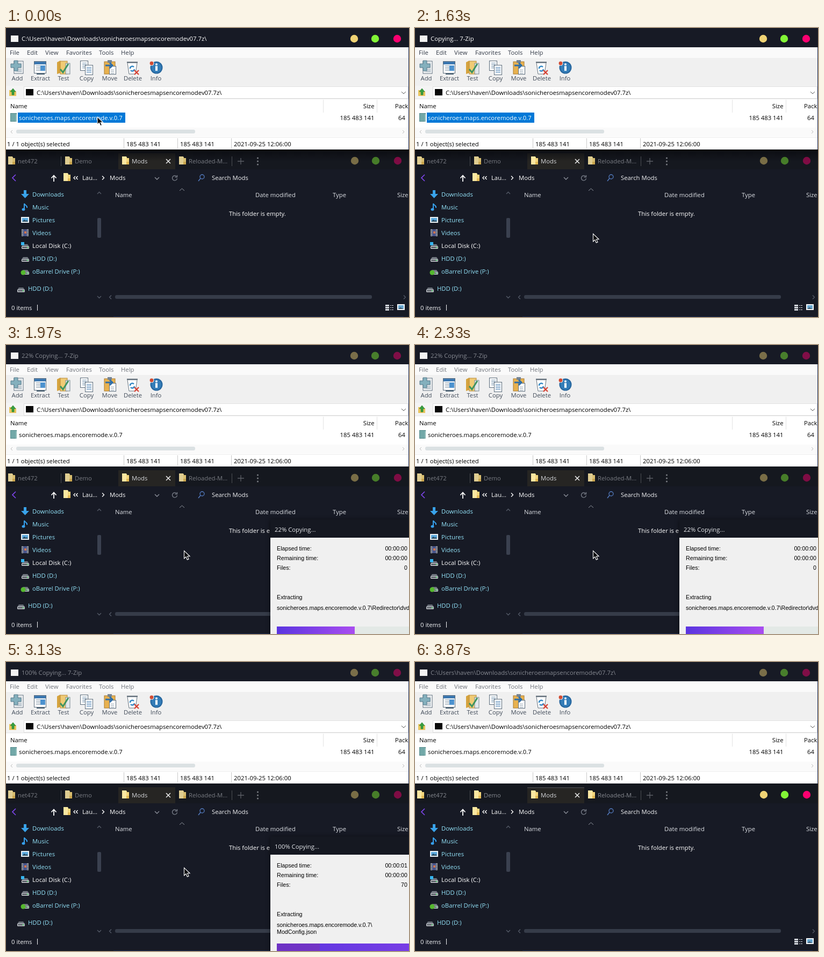
An HTML page for the animation above (3.91 s loop, 750 px wide and 540 px high).

```html
<!DOCTYPE html>
<html lang="en">
<head>
<meta charset="utf-8">
<title>Drag and drop extraction</title>
<style>
html, body { margin: 0; width: 100%; height: 100%; overflow: hidden; background: #171a25; }
svg { display: block; width: 750px; height: 540px; }
text { font: 11.3px "Open Sans", "Noto Sans", sans-serif; white-space: pre; }
#dialog .body text { font: 10.7px "Liberation Sans", Arial, sans-serif; }
#dialog { filter: drop-shadow(0 1px 4px #0008); }
</style>
</head>
<body>
<svg id="stage" viewBox="0 0 750 540" xmlns="http://www.w3.org/2000/svg"></svg>
<script>
const LOOP = 3910;
const PATH = "C:\\Users\\haven\\Downloads\\sonicheroesmapsencoremodev07.7z\\";
const MOD = "sonicheroes.maps.encoremode.v.0.7";
const INK = "#171a25", CYAN = "#93e2f8";

// Drawing helpers; text is placed by its middle line
const text = (x, y, s, fill = "#000", more = "") =>
  `<text x="${x}" y="${y + 4}" fill="${fill}" ${more}>${s}</text>`;
const rect = (x, y, w, h, fill, more = "") =>
  `<rect x="${x}" y="${y}" width="${w}" height="${h}" fill="${fill}" ${more}/>`;
const line = (d, stroke, width = 1, more = "") =>
  `<path d="${d}" fill="none" stroke="${stroke}" stroke-width="${width}" ${more}/>`;
const shape = (d, fill, more = "") => `<path d="${d}" fill="${fill}" ${more}/>`;
const dot = (x, y, r, fill) => `<circle cx="${x}" cy="${y}" r="${r}" fill="${fill}"/>`;
const at = (x, y, s) => `<g transform="translate(${x} ${y})">${s}</g>`;
const END = 'text-anchor="end"', MID = 'text-anchor="middle"';

const folder = (x, y) => at(x, y,
  shape("M0 1h9v2h4v12H0z", "#f3d67c") + rect(0, 0, 8, 15, "#fbe7a1") + rect(8, 10, 5, 5, "#e3ba55"));
const drive = (x, y) => at(x, y,
  shape("M3 1h8l3 4H0z", "#6f757e") + rect(0, 5, 14, 4.500, "#dfe2e6", 'rx="1"') + rect(1, 6, 12, 2, "#3b4049") + rect(10, 6, 2, 2, "#46d365"));
const page = (x, y, w, h) => rect(x, y, w, h, "#fff", 'stroke="#5a6b7b"');
const rules = (x, y, w, n, c) =>
  Array.from({ length: n }, (_, i) => rect(x, y + i * 3, w, 1, c)).join("");
const buttons = (id, x, y) => `<g id="${id}">` +
  dot(x, y, 7.2, "#efd274") + dot(x + 39, y, 7.2, "#82f436") + dot(x + 80, y, 7.2, "#fb0070") + "</g>";

const tools = [
  ["Add", 21, page(-6, -12, 17, 23) + rect(-4, -10, 13, 19, "#d7dde1") + rules(0, 4, 8, 2, "#9fb0bd")
    + shape("M-6-13h7v6h6v7H1v6h-7v-6h-6v-7h6z", "#84b0bd", 'stroke="#55798a"')],
  ["Extract", 64, page(-11.5, -11.5, 22, 22) + rect(-11, -11, 21, 5, "#3d78b0") + rules(-8, -4, 8, 4, "#8496a5")
    + rect(0, -4, 9, 10, "#4c92cf") + line("M-7 12h15", "#4f6576", 2)],
  ["Test", 107, shape("M-12-10l6-3v23l-6 2z", "#d5a33e") + rect(-6, -12, 13, 24, "#f0cb75", 'stroke="#b98a38"')
    + rect(4, -8, 8, 20, "#e1e7ea", 'stroke="#7d8b93"') + line("M-6 3l5 6L9-7", "#3f9460", 3)],
  ["Copy", 150, page(-11.5, -12.5, 14, 18) + rules(-8, -9, 8, 4, "#6a8ca8")
    + page(-2.5, -4.5, 14, 18) + rules(0, -1, 9, 4, "#3d78b0")],
  ["Move", 193, rect(-10, -11, 20, 23, "#e8b14f", 'stroke="#a77a31"') + rect(-4, -14, 8, 5, "#768492")
    + page(-0.5, -2.5, 12, 15) + rules(2, 4, 6, 3, "#91a2b0") + line("M-8-4h12M0-9l5 5-5 5", "#306fa8", 3)],
  ["Delete", 236, shape("M-10-9H8L5 12H-7z", "#fff", 'stroke="#64717c"') + line("M-11-10H9", "#64717c", 2)
    + line("M-5 2a4 4 0 0 1 7-3M3 3a4 4 0 0 1-7 2", "#3489c6", 2.5) + line("M3 5l8 8m0-8l-8 8", "#d74436", 2.4)],
  ["Info", 279, dot(1, 0, 11.5, "#25659d") + dot(1, 0, 9.5, "#347db8")
    + rect(-1, -3, 4, 9, "#fff") + dot(1, -6, 2, "#fff") + dot(-8, -8, 4.5, "#f1eeee") + dot(-8, -8, 3.4, "#d14b32")]
];

const archive = () => rect(0, 0, 750, 37, INK) + rect(9, 14, 14, 12, "#f2f2f2")
  + text(29, 20, "", "#fff", 'id="title"') + buttons("topKeys", 648, 20)
  + rect(0, 36, 749, 191, "#fff") + rect(0, 56, 749, 52, "#f0f0f0") + rect(0, 36, 749, 20, "#fafafa")
  + `<g id="menu">` + [["File", 7], ["Edit", 39], ["View", 73], ["Favorites", 112], ["Tools", 173], ["Help", 214]]
    .map(([s, x]) => text(x, 46, s, "currentColor")).join("") + "</g>"
  + tools.map(([s, x, icon]) => at(x, 74, icon) + text(x, 94, s, "#414b59", MID)).join("")
  + rect(0, 108, 749, 25, "#f4f4f4") + rect(33.5, 109.5, 715, 22, "#fff", 'stroke="#dedede"')
  + shape("M6 116h5l1 2h7v9H6z", "#e8c55d") + shape("M11 125v-6H8l5-6 5 6h-3v6z", "#35a03f", 'stroke="#267330" stroke-width=".6"')
  + rect(37, 114, 14, 12, "#080808") + text(57, 120.5, PATH) + line("M736 119l4 4 4-4", "#555")
  + rect(0, 132, 749, 1, "#e6e6e6")
  + text(8, 146, "Name") + text(685.5, 146, "Size", "#000", END) + text(724, 146, "Pack")
  + line("M590.5 134v24M690.5 134v24", "#e2e2e2")
  + rect(8.5, 159.5, 11, 15, "#72a8a8", 'stroke="#578c8d"') + rect(18, 161, 2, 14, "#8fbab8")
  + rect(22, 158, 200, 19, "#0078d7", 'id="pick"')
  + text(24, 168, MOD, "#000", 'id="file"')
  + text(685.5, 168, "185 483 141", "#000", END) + text(743, 168, "64", "#000", END)
  + rect(0, 186, 749, 17, "#fafafa") + rect(19, 190, 333, 7, "#dbe1e3", 'rx="3"')
  + line("M12 191l-3 3 3 3M738 191l3 3-3 3", "#bbb")
  + rect(0, 204, 749, 1, "#ececec") + line("M219.5 206v20M319.5 206v20M419.5 206v20", "#c9c9c9")
  + [[2, "1 / 1 object(s) selected"], [224, "185 483 141"], [324, "185 483 141"], [424, "2021-09-25 12:06:00"]]
    .map(([x, s]) => text(x, 217, s)).join("")
  + rect(749, 36, 1, 191, "#1d2d59");

const sideIcons = [
  shape("M5 0h5v7h5l-7.500 8L0 7h5z", "#39a3ea"),
  line("M6 11V1c1 4 6 3 5 8", "#37a0ee", 2) + `<ellipse cx="4.500" cy="12" rx="3" ry="2.500" fill="#37a0ee"/>`,
  rect(0, 2, 15, 11, "#e9f1f6") + rect(2, 4, 11, 7, "#5ba9dd") + shape("M2 11l4-4 3 2 2-1 2 3z", "#294d63"),
  rect(1, 1, 13, 13, "#b9c0c9") + rect(4, 1, 7, 13, "#4a568c") + line("M2.500 2v12M12.500 2v12", "#22252e", 1.500, 'stroke-dasharray="2 1"') + rect(6, 5, 4, 4, "#cf7651"),
  drive(1, 4) + rect(0, 1, 6, 6, "#35b4ee"),
  drive(1, 4),
  drive(1, 4) + dot(4, 10, 4.5, "#55b82e")
];
const sideNames = ["Downloads", "Music", "Pictures", "Videos", "Local Disk (C:)", "HDD (D:)", "oBarrel Drive (P:)"];

const explorer = () => rect(0, 227, 750, 313, INK) + rect(0, 227, 750, 37, "#15181f")
  + rect(209, 234, 106, 30, "#262523") + rect(209, 234, 106, 1.5, "#45474b", 'id="tabEdge"')
  + rect(0, 227, 750, 22, "url(#shade)", 'id="shadow"')
  + [[4, "net472"], [110, "Demo"], [216, "Mods"], [322, "Reloaded-M..."]]
    .map(([x, s], i) => `<g${i == 2 ? "" : ' class="idle"'}>` + folder(x, 240) + text(x + 18, 249, s, i == 2 ? "#d5d7da" : "#868990") + "</g>").join("")
  + line("M102.500 240v18M420.500 240v18", "#4c4e54") + line("M298 245l8 8m0-8l-8 8", "#eee", 1.500)
  + line("M431 249h12M437 243v12", "#5b5e65", 1.3) + [243, 249, 255].map(y => dot(468.5, y, 1.6, "#777a80")).join("")
  + buttons("lowKeys", 649, 248)
  + line("M18 274l-6 6 6 6", "#7f45ec", 1.7) + line("M89 287v-11M84.500 280.500l4.500-5 4.500 5", "#fff", 1.800)
  + folder(107, 271) + line("M129 277l-3 3 3 3M133.500 277l-3 3 3 3M179 276.500l3.500 3.500-3.500 3.500", "#fff", 1.4)
  + text(142, 280, "Lau...", "#fff") + text(193, 280, "Mods", "#fff") + text(383, 280, "Search Mods", "#f2f3f5")
  + line("M277 279l4 4 4-4", "#8a8f99", 1.4) + line("M317 277a4.500 4.500 0 1 0 1.500 4M318.500 275v3.500h-4", "#777c87", 1.4)
  + `<circle cx="365" cy="278" r="4" fill="none" stroke="#547cc1" stroke-width="1.300"/>` + line("M362 281l-4 5", "#547cc1", 1.5)
  + [[203, "Name"], [464, "Date modified"], [608, "Type"], [728, "Size"]].map(([x, s]) => text(x, 312, s, "#dcdfe4")).join("")
  + line("M323 304l4.500-4 4.500 4", "#9499a3") + text(415, 347, "This folder is empty.", "#fff")
  + sideNames.map((s, i) => at(28, 303 + i * 24, sideIcons[i]) + text(49, 311 + i * 24, s, i == 4 ? "#fff" : CYAN)).join("")
  + drive(21, 484) + text(41, 487, "HDD (D:)", CYAN)
  + rect(170, 355, 7, 37, "#3b4150", 'rx="2"') + line("M170 310l3.500-3.500 3.500 3.500M170 501l3.500 3.500 3.500-3.500", "#555b68", 1.3)
  + rect(203, 499, 478, 7, "#363c49", 'rx="3"') + line("M196 499.500l-3.500 3.500 3.500 3.500M740 499.500l3.500 3.500-3.500 3.500", "#555b68", 1.3)
  + text(10, 523, "0 items", "#f4f5f7") + rect(58, 517, 1, 11, "#f4f5f7")
  + [517, 521, 525].map(y => rect(706, y, 7, 3, "#d3d7dc") + rect(715, y + 1, 2, 1, "#d3d7dc") + rect(718, y + 1, 3, 1, "#d3d7dc")).join("")
  + rect(728, 516, 14, 11, "#f7fafc") + rect(730, 518, 10, 7, "#69a7d0") + shape("M730 525l4-3 6 3z", "#39556b")
  + rect(200, 539, 540, 1, "#17264d");

const dialog = () => `<g id="dialog">` + rect(492, 326, 682, 34, "#151821") + rect(492, 360, 682, 400, "#f0f0f0")
  + text(500, 345, "", "#e4e6ea", 'id="dlgTitle"') + `<g class="body">`
  + text(504, 380, "Elapsed time:") + text(504, 398, "Remaining time:") + text(504, 416, "Files:")
  + text(747, 380, "", "#000", END + ' id="elapsed"') + text(747, 398, "00:00:00", "#000", END)
  + text(747, 416, "", "#000", END + ' id="files"')
  + `<g id="work">` + text(504, 471, "Extracting") + text(504, 491, "", "#000", 'id="item1"') + text(504, 504, "", "#000", 'id="item2"')
  + rect(504, 526, 659, 24, "#e3e9e6") + rect(504, 526, 0, 24, "url(#bar)", 'id="fill"')
  + rect(504, 526, 80, 24, "#8a2f9c", 'id="glow" opacity=".4"') + "</g></g></g>";

const stage = document.getElementById("stage");
stage.innerHTML = `<defs>
  <linearGradient id="shade" x2="0" y2="1"><stop stop-color="#08090d" stop-opacity=".75"/><stop offset="1" stop-color="#08090d" stop-opacity="0"/></linearGradient>
  <linearGradient id="bar"><stop stop-color="#5a35df"/><stop offset="1" stop-color="#a94df0"/></linearGradient></defs>`
  + explorer() + archive() + dialog()
  + `<g id="cursor">` + shape("M0 0v14.500l3.400-3.200 2.400 5.500 2.700-1.200-2.400-5.300h4.500z", "#08090c", 'stroke="#fff" stroke-width="1.100"') + "</g>";

const el = Object.fromEntries([...stage.querySelectorAll("[id]")].map(n => [n.id, n]));
const idle = stage.querySelectorAll(".idle");

// Timeline: [time, percent, elapsed seconds, files]
const progress = [[0, 22, 0, 0], [2430, 41, 0, 18], [2630, 63, 0, 37], [2840, 84, 1, 55], [3020, 100, 1, 70]];
// Pointer path: [time, x, y]
const pointer = [[0, 170, 166], [770, 169, 165.500], [890, 169, 165.500], [1070, 213, 231], [1300, 302, 348], [1490, 331.500, 384.500], [LOOP, 331.500, 384.500]];

const ramp = (t, a, b) => Math.min(1, Math.max(0, (t - a) / (b - a)));
const easeOut = k => 1 - (1 - k) ** 2;
const put = (node, s) => { if (node.textContent !== s) node.textContent = s; };
const set = (node, name, v) => node.setAttribute(name, v);

function render(t) {
  const topOn = 1 - ramp(t, 1740, 1810), lowOn = ramp(t, 3720, 3850);
  const [, pct, secs, files] = progress.filter(p => p[0] <= t).pop();
  const label = (t < 1740 ? "" : pct + "% ") + "Copying...";

  put(el.title, t < 1560 || t >= 3480 ? PATH : label + " 7-Zip");
  set(el.title, "fill", topOn > .5 ? "#fff" : "#858890");
  set(el.topKeys, "opacity", .46 + .54 * topOn);
  set(el.lowKeys, "opacity", .46 + .54 * lowOn);
  set(el.menu, "color", topOn > .5 ? "#343b48" : "#70747c");
  set(el.shadow, "opacity", topOn);
  set(el.tabEdge, "opacity", lowOn);
  idle.forEach(n => set(n, "opacity", .88 + .12 * lowOn));
  set(el.pick, "opacity", topOn > .5 ? 1 : 0);
  set(el.file, "fill", topOn > .5 ? "#fff" : "#000");

  // Window pops in and out about its centre
  const show = easeOut(ramp(t, 1760, 1915)) * (1 - ramp(t, 3300, 3450));
  const size = .97 + .03 * show;
  set(el.dialog, "opacity", show);
  set(el.dialog, "transform", `translate(833 560) scale(${size}) translate(-833 -560)`);
  put(el.dlgTitle, label);
  put(el.elapsed, "00:00:0" + secs);
  put(el.files, String(files));
  set(el.work, "opacity", t < 1960 ? 0 : 1);
  put(el.item1, MOD + (pct < 100 ? "\\Redirector\\dvdroot" : "\\"));
  put(el.item2, pct < 100 ? "" : "ModConfig.json");
  set(el.fill, "width", 6.59 * pct);
  set(el.glow, "visibility", pct < 100 ? "hidden" : "inherit");

  const i = pointer.findIndex(p => p[0] > t);
  const [t0, x0, y0] = pointer[i - 1], [t1, x1, y1] = pointer[i];
  const k = ramp(t, t0, t1), e = i == 3 ? k * k : i == 5 ? easeOut(k) : k;
  set(el.cursor, "transform", `translate(${x0 + (x1 - x0) * e} ${y0 + (y1 - y0) * e})`);
  set(el.cursor, "opacity", t < 3680 ? 1 : 0);
}

const start = performance.now();
function tick() {
  render((performance.now() - start) % LOOP);
  requestAnimationFrame(tick);
}
tick();
</script>
</body>
</html>
```
